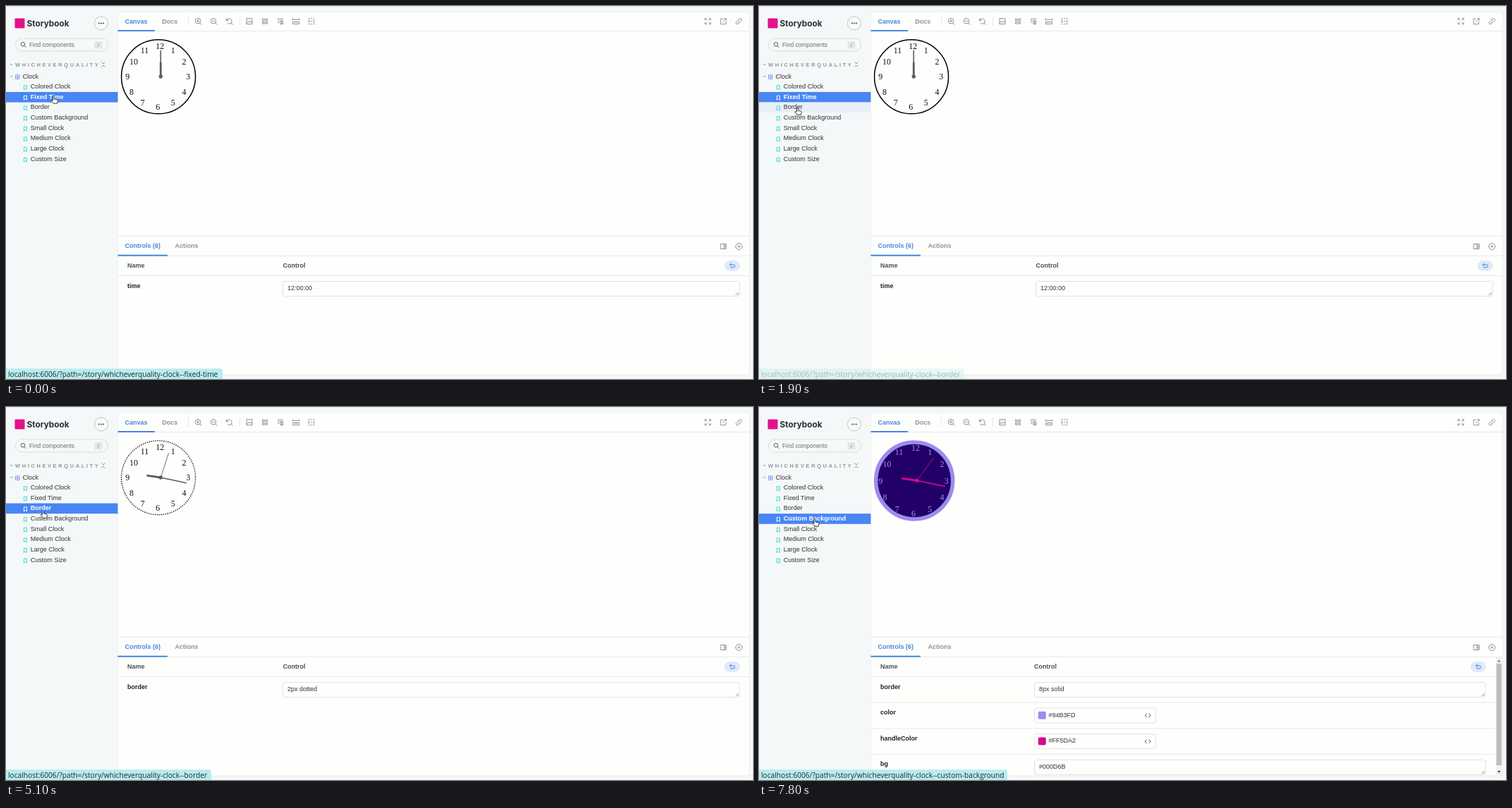
Animation, 1059 px wide and 529 px high, one loop 8 s. Source, as an HTML page:

```html
<!DOCTYPE html>
<html lang="en">
<head>
<meta charset="utf-8">
<title>Clock stories</title>
<style>
html, body { margin: 0; width: 100%; height: 100%; overflow: hidden; background: #f4f8f8; }
svg { display: block; width: 1059px; height: 529px; }
text { font: 9px "Liberation Sans", Arial, sans-serif; fill: #333; white-space: pre; }
.bold { font-weight: 700; }
.tab { font-weight: 700; fill: #8b9397; }
.on { fill: #4685e2; }
.head { font-weight: 700; fill: #4b5054; }
.label { font-weight: 700; fill: #222; }
.num { font: 12px "Liberation Serif", Times, serif; }
.icon { fill: none; stroke: #899195; stroke-width: 1; }
.rule { fill: none; stroke: #e5e9e8; }
.field { fill: #fefffc; stroke: #dfe3e2; }
</style>
</head>
<body>
<svg id="stage" viewBox="0 0 1059 529"></svg>
<script>
const LOOP = 8000;
const ROW = 14.64, ROW_TOP = 107.3;
const stories = ['Colored Clock', 'Fixed Time', 'Border', 'Custom Background',
  'Small Clock', 'Medium Clock', 'Large Clock', 'Custom Size'];
const FIXED = 1, BORDER = 2, CUSTOM = 3;
const $ = id => document.getElementById(id);

const text = (x, y, s, cls = '', extra = '') => `<text x="${x}" y="${y}" class="${cls}" ${extra}>${s}</text>`;
const rect = (x, y, w, h, extra = '') => `<rect x="${x}" y="${y}" width="${w}" height="${h}" ${extra}/>`;
const path = (d, extra = 'class="icon"') => `<path d="${d}" ${extra}/>`;
const icon = (x, y, d) => path(d, `class="icon" transform="translate(${x} ${y})"`);
const rule = (x1, x2, y) => path(`M${x1} ${y}H${x2}`, 'class="rule"');
const circle = (x, y, r, extra) => `<circle cx="${x}" cy="${y}" r="${r}" ${extra}/>`;
const group = (id, body) => `<g id="${id}">${body}</g>`;

function sidebar() {
  const rows = stories.map((name, i) => {
    const y = ROW_TOP + i * ROW;
    return rect(0, y, 158.5, ROW, `id="row${i}"`) +
      path(`M25.4 ${y + 5.4}h4v6l-2-1.6l-2 1.6z`, `id="mark${i}" fill="none" stroke-width="1"`) +
      text(34.7, y + 9.8, name, '', `id="name${i}"`);
  }).join('');
  return rect(12.5, 17.5, 14, 14, 'rx="1" fill="#e6108a"') +
    text(29.5, 29, 'Storybook', '', 'style="font:700 11.8px Inter,sans-serif;fill:#2b2f33"') +
    circle(135, 24.5, 9.5, 'fill="#f8fbfa" stroke="#b8bfc1" stroke-width=".9"') +
    [-3, 0, 3].map(d => circle(135 + d, 24.5, 1.1, 'fill="#555c60"')).join('') +
    rect(13.5, 46, 131, 18, 'rx="9" fill="#f6f9f9" stroke="#d8dddd"') +
    circle(24, 54.3, 2.8, 'class="icon" style="stroke:#555c60"') +
    path('M26 56.4l2.3 2.4', 'stroke="#555c60"') +
    text(33, 58, 'Find components', '', 'style="font-size:8.35px;fill:#666d70"') +
    rect(125.5, 50, 11, 10.5, 'rx="2" fill="#e1e6e6"') +
    text(129.8, 58, '/', '', 'style="font-size:7.5px;fill:#777e81"') +
    path('M6 83h3.4') +
    text(13, 86, 'WHICHEVERQUALITY', 'bold', 'style="font-size:7.5px;letter-spacing:2.6px;fill:#8f979a"') +
    path('M135.5 79.5l2.5 2.4l2.5-2.4M135.5 86.5l2.5-2.4l2.5 2.4') +
    path('M6 99l1.7 1.6l1.7-1.6') +
    path('M13.5 97.8h5.6v5.6h-5.6zM16.3 97.8v5.6M13.5 100.6h5.6', 'fill="none" stroke="#7a95f6" stroke-width=".9"') +
    text(23.6, 102.6, 'Clock') + rows;
}

function toolbar() {
  const lens = 'M3.3 -.5a3.8 3.8 0 1 1-7.6 0a3.8 3.8 0 1 1 7.6 0M2.3 2.3l2.7 2.7M-2.5 -.5h4';
  const box = 'M-4-4h8v8h-8z';
  return text(168.5, 24.7, 'Canvas', 'tab on') + text(221.2, 24.7, 'Docs', 'tab') +
    rule(159, 1054, 35.5) + rect(158.5, 34, 52.5, 2, 'fill="#4685e2"') +
    path('M258.5 15v13M331.5 15v13', 'class="rule"') +
    icon(272.5, 21.7, lens + 'M-.5-2.5v4') + icon(294.5, 21.7, lens) +
    icon(316.5, 21.7, 'M-3.5-1.5a3.7 3.7 0 1 1 .6 3.8M-4-4.2v3h3M2.6 2.4l2.4 2.6') +
    icon(345, 21.7, box + 'M-4 3l2.5-3l1.6 1.5l1.5-2l2.4 2.6M-1.8-2v.5') +
    icon(367, 21.7, 'M-3.5-3.5h2.6v2.6h-2.6zM.9-3.5h2.6v2.6h-2.6zM-3.5.9h2.6v2.6h-2.6zM.9.9h2.6v2.6h-2.6z') +
    icon(389, 21.7, 'M-4-3.5h8M-4-1h2.5M-4 1.5h2.5M0-1h3.6v5h-3.6zM1.8-1v5') +
    icon(411, 21.7, 'M-4.5-4v3M4.5-4v3M-4.5-2.5h9M-4.5.8h9v3h-9zM-1.5.8v1.5M1.5.8v1.5') +
    `<g stroke-dasharray="2 1.2">${icon(433, 21.7, box + 'M-4 0h8')}</g>` +
    icon(995, 21.7, 'M-4-1.5v-2.5h2.5M4-1.5v-2.5h-2.5M-4 1.5v2.5h2.5M4 1.5v2.5h-2.5M-4-4l2.8 2.8M4-4l-2.8 2.8M-4 4l2.8-2.8M4 4l-2.8-2.8') +
    icon(1017, 21.7, 'M-.5-3.5h-3.5v7.5h7.5v-3.5M1-4h3v3M4-4l-5 5') +
    icon(1039, 21.7, 'M-.8-1.8l1.7-1.7a1.9 1.9 0 0 1 2.7 2.7l-2 2a1.9 1.9 0 0 1-2.7 0M.8 1.8l-1.7 1.7a1.9 1.9 0 0 1-2.7-2.7l2-2a1.9 1.9 0 0 1 2.7 0');
}

const resetButton = x => rect(x, 361.8, 20.6, 13.2, 'rx="6.6" fill="#dfeafb" stroke="#cfdef6" stroke-width=".8"') +
  path(`M${x + 9} 364.8l-2.3 2.1l2.3 2.1M${x + 7} 366.9h5a2 2 0 0 1 0 4h-4.5`, 'fill="none" stroke="#3f82e6"');

const area = (x, y, w, value) => rect(x + .5, y + .5, w - 1, 21, 'rx="2.5" class="field"') +
  path(`M${x + w - 6} ${y + 20}l4-4M${x + w - 3.5} ${y + 20}l1.5-1.5`, 'stroke="#777" stroke-width=".8"') +
  text(x + 7, y + 13.2, value);

const colorField = (y, color, value) => rect(390.5, y + .5, 172, 21, 'rx="2.5" class="field"') +
  rect(395.8, y + 5.3, 11, 11, `rx="2" fill="${color}"`) + text(410.5, y + 13, value) +
  path(`M549.8 ${y + 8.5}l-2.6 2.5l2.6 2.5M552.6 ${y + 8.5}l2.6 2.5l-2.6 2.5`, 'fill="none" stroke="#444"');

const oneControl = (id, name, value) => group(id, text(392.5, 371, 'Control', 'head') + resetButton(1019.2) +
  rule(159, 1054, 382.5) + text(172, 399.8, name, 'label') + area(392, 390, 648.5, value));

function panel() {
  const names = ['border', 'color', 'handleColor', 'bg'];
  const many = text(390, 371, 'Control', 'head') + resetButton(1009.4) +
    [382.5, 419, 456, 492.5].map(y => rule(159, 1044, y)).join('') +
    names.map((n, i) => text(172, 399.8 + 36.5 * i, n, 'label')).join('') +
    area(390, 390, 640.5, '8px solid') + colorField(426.5, '#9d8bf0', '#94B3FD') +
    colorField(463.2, '#db058f', '#FF5DA2') + area(390, 500, 640.5, '#000D6B') +
    rect(1044.5, 354.5, 9, 168, 'fill="#f0f2f0"') + rect(1045.5, 364, 7.2, 144, 'fill="#bcbebd"') +
    path('M1046.7 361.5l2.3-3l2.3 3z', 'fill="#777"') + path('M1046.7 516l2.3 3l2.3-3z', 'fill="#444"');
  return rule(159, 1054, 326.5) + rule(159, 1054, 354.3) +
    text(168.5, 343, 'Controls (6)', 'tab on') + text(239.5, 343, 'Actions', 'tab') +
    rect(158.5, 352.7, 70.5, 2, 'fill="#4685e2"') +
    icon(1017, 341, 'M-4-3.5h8v7h-8zM1-3.5v7M1-1h3M1 1h3') +
    icon(1039, 341, 'M4.5 0a4.5 4.5 0 1 1-9 0a4.5 4.5 0 1 1 9 0M-1.7-1.7l3.4 3.4M1.7-1.7l-3.4 3.4') +
    text(172, 371, 'Name', 'head') +
    oneControl('panel1', 'time', '12:00:00') + oneControl('panel2', 'border', '2px dotted') + group('panel3', many);
}

// Numerals are left aligned on their ring, so two-digit ones lean right.
function clock(id, c) {
  const numerals = Array.from({length: 12}, (_, i) => {
    const a = (i + 1) * Math.PI / 6;
    return text(c.nx - 3 + c.ring * Math.sin(a), c.ny + 4 - c.ring * Math.cos(a), i + 1, 'num', `style="fill:${c.ink}"`);
  }).join('');
  const hand = (name, length, width) =>
    path(`M0 0V${-length}`, `id="${id}${name}" stroke="${c.hand}" stroke-width="${width}"`);
  return group(id, circle(c.cx, c.cy, c.r, c.face) + numerals +
    `<g transform="translate(${c.hx} ${c.hy})">` + hand('Hour', c.reach * .55, 2.8) +
    hand('Minute', c.reach + .8, 1.6) + hand('Second', c.reach, .8) +
    circle(0, 0, 2.7, `fill="${c.hand}"`) + '</g>');
}

const plain = {cx: 216.1, cy: 100.3, r: 52.5, nx: 215.3, ny: 100, ring: 43, ink: '#111',
  hx: 219.3, hy: 100, reach: 36.5, hand: '#5d5d5d'};
const clocks = {
  clock1: {...plain, face: 'fill="#fefffc" stroke="#000" stroke-width="1.5"'},
  clock2: {...plain, face: 'fill="#fefffc" stroke="#000" stroke-width="1.6" stroke-linecap="round" stroke-dasharray="0 3"'},
  clock3: {cx: 220.2, cy: 104.5, r: 54.5, nx: 219, ny: 104.5, ring: 46.7, ink: '#9d8bf0',
    hx: 224, hy: 104.3, reach: 40, hand: '#db058f', face: 'fill="#210067" stroke="#9d8bf0" stroke-width="5.5"'}
};

$('stage').innerHTML = rect(0, 0, 1059, 529, 'fill="#f4f8f8"') + rect(0, 0, 1059, 1.2, 'fill="#dcebe5"') +
  rect(158, 8, 896.5, 515.5, 'rx="3" fill="#e3e8e8"') + rect(158.6, 8.6, 895.2, 514.2, 'rx="3" fill="#fefffc"') +
  sidebar() + toolbar() + panel() + Object.entries(clocks).map(([id, c]) => clock(id, c)).join('') +
  group('status', path('', 'id="statusBox" fill="#b9ecef"') +
    text(3, 525.8, '', '', 'id="url" style="font:10.2px \'Open Sans\',\'Noto Sans\',sans-serif;fill:#1c2b2f"')) +
  path('M-1 .8C-1-.4 1-.4 1 .8V4.4L4.6 5.2C5.8 5.5 6 6.2 5.8 7.2L5 10.6H-.2L-3.3 6.8C-3.8 5.8-2.6 5.2-1.8 5.9L-1 6.6Z',
    'id="pointer" fill="#fff" stroke="#222" stroke-width=".9" stroke-linejoin="round"');

const clamp = v => Math.max(0, Math.min(1, v));
const ease = v => v * v * (3 - 2 * v);
const show = (id, visible) => $(id).setAttribute('display', visible ? 'inline' : 'none');

function pointerAt(t) {
  const move = (from, to, p) => from.map((v, i) => v + (to[i] - v) * p);
  if (t >= 5100) return move([52.6, 146.7], [79.2, 158.6], ease(clamp((t - 5100) / 800)));
  if (t >= 2300) return [53.5, 145.3];
  return move([67.6, 127.6], [53.8, 144.6], ease(clamp((t - 1200) / 800)));
}

function setHands(id, hour, minute, second) {
  const turn = (name, angle) => $(id + name).setAttribute('transform', `rotate(${angle})`);
  turn('Hour', hour * 30 + minute / 2);
  turn('Minute', minute * 6);
  turn('Second', second * 6);
}

function setStatus(slug, width, opacity) {
  $('url').textContent = 'localhost:6006/?path=/story/whicheverquality-clock--' + slug;
  $('statusBox').setAttribute('d', `M0 514.3H${width - 3}q3 0 3 3V529H0Z`);
  $('status').setAttribute('opacity', opacity);
}

function render(time) {
  const t = Math.floor(time / 100) * 100;
  const selected = t < 4100 ? FIXED : t < 7500 ? BORDER : CUSTOM;
  const hovered = t < 1700 ? FIXED : t < 5500 ? BORDER : CUSTOM;
  const leaving = t >= 4100 && t < 4300 ? FIXED : -1;

  stories.forEach((_, i) => {
    const active = i === selected;
    $('row' + i).setAttribute('fill', active ? '#4885f5' : i === leaving ? '#dae3f5' : i === hovered ? '#e8eff8' : 'none');
    $('mark' + i).setAttribute('stroke', active ? '#fff' : '#3fd8d2');
    $('name' + i).style.fill = active ? '#fff' : '#333';
    $('name' + i).style.fontWeight = active ? 700 : 400;
  });

  const face = t < 4300 ? 1 : t < 7500 ? 2 : 3;
  for (const n of [1, 2, 3]) {
    show('panel' + n, n === selected);
    show('clock' + n, n === face);
  }
  const second = t < 5200 ? 3 : t < 6100 ? 4 : t < 7300 ? 5 : 6;
  setHands('clock2', 9, 17, second);
  t < 7800 ? setHands('clock3', 0, 0, 0) : setHands('clock3', 9, 17, second);

  if (t < 1700) setStatus('fixed-time', 307, clamp(1 - t / 300));
  else if (t < 5500) setStatus('border', 291, clamp((t - 1800) / 300));
  else setStatus('custom-background', 352, 1);

  $('pointer').setAttribute('transform', `translate(${pointerAt(t)})`);
}

const start = performance.now();
function tick() {
  render((performance.now() - start) % LOOP);
  requestAnimationFrame(tick);
}
tick();
</script>
</body>
</html>
```
